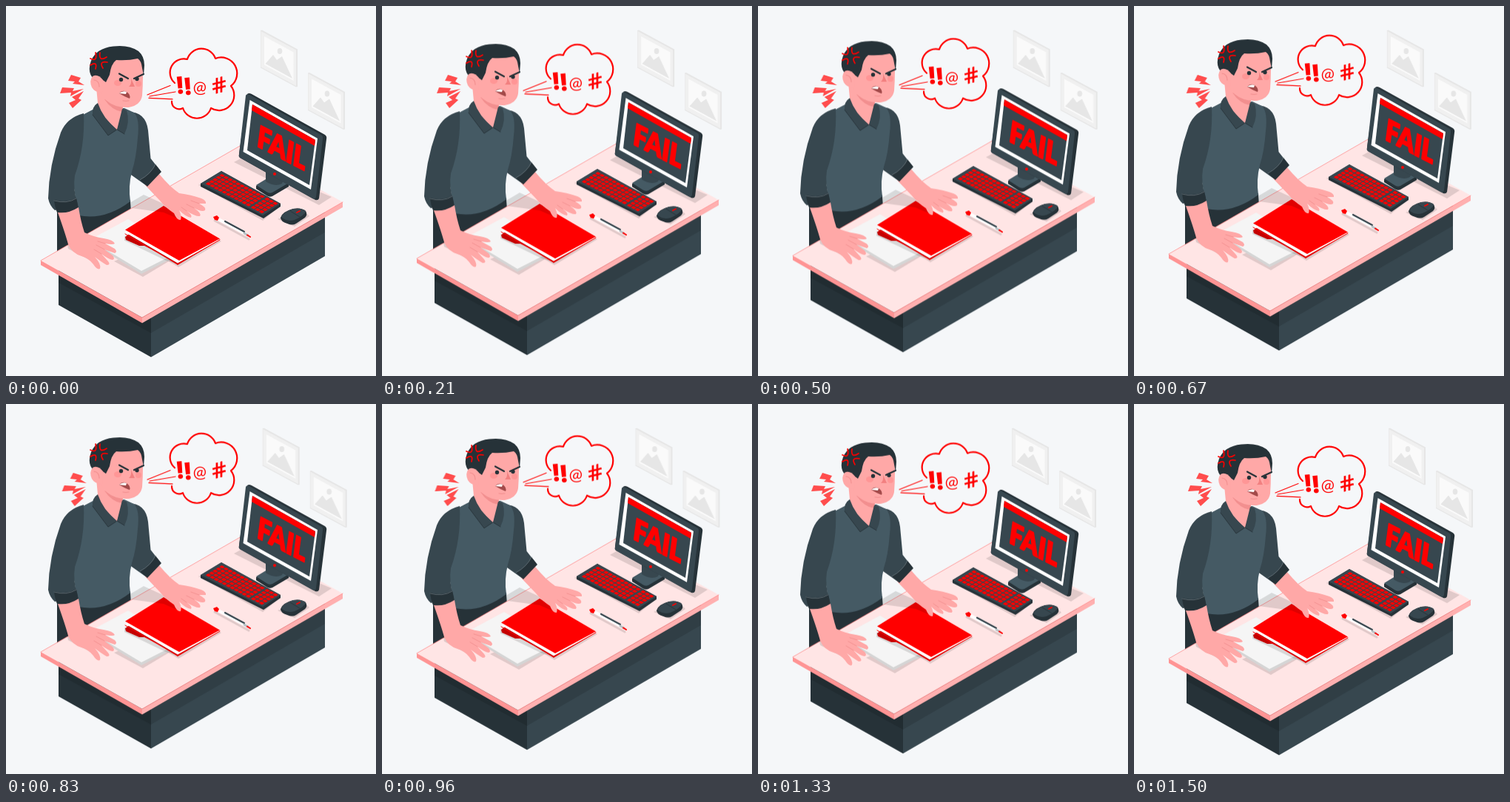
These frames come from a looping animation (500 px wide and 500 px high, 1.54 s). An HTML page:

```html
<!DOCTYPE html>
<html lang="en">
<head>
<meta charset="utf-8">
<title>Fail</title>
<style>
html, body { margin: 0; width: 100%; height: 100%; overflow: hidden; background: #f5f7f9; }
svg { display: block; width: 100vw; height: 100vh; }
text { font-family: Lato, "Open Sans", sans-serif; font-weight: 900; fill: #f00; }
.line { fill: none; stroke-linecap: round; stroke-linejoin: round; }
.shade { fill: #000; opacity: .12; }
</style>
</head>
<body>
<svg viewBox="0 0 500 500">
  <defs>
    <g id="frame">
      <path fill="#e6e6e6" d="M344 33 346 32.500 394 58.500V109L392 109.500 344 83.500Z"/>
      <path fill="#f0f0f0" d="M344.500 34 392 59.500V108L344.500 82.500Z"/>
      <path fill="#fafafa" d="M349 41 388.500 62.500V101L349 79.500Z"/>
      <path fill="#e6e6e6" d="M350.500 78 361 66 366 73 373 68 387 98Z"/>
      <ellipse fill="#e6e6e6" cx="370" cy="61" rx="3.300" ry="4"/>
    </g>
  </defs>

  <g class="shake">
    <use href="#frame"/>
    <use href="#frame" x="64" y="57.500"/>
  </g>

  <g class="float">
    <!-- body -->
    <path fill="#263238" d="M69 270 98 276 168 262 169 278 69 336Z"/>
    <path fill="#37474f" d="M165 143Q189 143 192 168L195.500 206 208 222 190 243 166 226Z"/>
    <path fill="#455a64" d="M102 148 121 138 160 138 173 144Q181 152 178 178 176 206 170 224 165 244 168 264 134 290 98 283L90 235Z"/>
    <path fill="#37474f" d="M105 145Q82 151 74 171 58 215 57 260 59 270 66 276L97 268Q90 247 93 229 107 190 105 145Z"/>
    <path fill="#263238" d="M65 262Q82 267 95 259L98 273Q84 283 70 281 66 273 65 262Z"/>
    <path class="line" stroke="#7b878d" stroke-width=".6" d="M65 263Q82 268 95 260"/>
    <!-- neck and head -->
    <path fill="#ffa8a7" d="M122 110 125 142 150 168 158 142 157 130Z"/>
    <path fill="#f28f8f" d="M133 126 158 136 157 143Q143 141 133 126Z"/>
    <path fill="#37474f" d="M124 131Q116 136 117 147L138 175 150 167Q131 152 124 131Z"/>
    <path fill="#37474f" d="M157 139 150 167 160 173Q168 157 163 141Z"/>
    <path class="line" stroke="#263238" stroke-width=".8" d="M117 147 138 175 150 167 160 173"/>
    <path fill="#ffa8a7" d="M130 84 138 70 184 68Q186 95 184 121 182 134 166 137 148 138 136 128 128 122 128 105Z"/>
    <path fill="#263238" d="M119 99Q109 90 115 74 122 57 145 54.500 166 52 179 61 187 68 187 80L186 94 184 84Q183 74 178 71 165 74 149 73 142 78 140 93L135 103 128 98Z"/>
    <path fill="#ffa8a7" d="M131 100Q124 91 117 95 112 101 116 110 121 118 130 116Z"/>
    <path class="line" stroke="#f28f8f" stroke-width="1.200" d="M119 100Q126 101 126 109"/>
    <ellipse fill="#ff8a8a" opacity=".6" cx="151" cy="104" rx="5" ry="4"/>
    <ellipse fill="#ff8a8a" opacity=".6" cx="179" cy="105" rx="4" ry="4"/>
    <path fill="#f28080" d="M169 98 174 109 166 109Q170 106 169 98Z"/>
    <g fill="#263238"><circle cx="155.500" cy="99.500" r="2.700"/><circle cx="177" cy="98.500" r="2.700"/></g>
    <path class="line" stroke="#263238" stroke-width="2.200" d="M153 91.500 165 98M186 92 173 98"/>
    <path fill="#a34a4a" d="M153 118Q157 113 163 116 169 120 167 125 161 123 153 118Z"/>
    <path fill="#fff" d="M153 118Q158 114 163 116L162 119Z"/>
    <path class="line" stroke="#f28f8f" d="M158 128Q162 129 166 128"/>
    <path class="line" stroke="#f00" stroke-width="1.700" d="M114 71Q124 76 121 63M127 63Q125 76 136 69M137 76Q125 74 131 84M121 85Q124 74 114 80"/>

    <!-- desk -->
    <path fill="#263238" d="M71 350 196 412V474.500L71 404Z"/>
    <path fill="#37474f" d="M196 412 431 278V338L196 474.500Z"/>
    <path class="shade" d="M71 350 196 412V442L71 374Z"/>
    <path class="shade" d="M196 412 431 278V306L196 442Z"/>
    <path fill="#ffe5e5" d="M47 344 318 188 455 265 184 421Z"/>
    <path fill="#ff9494" d="M47 344 184 421V428.500L47 350Z"/>
    <path fill="#ffb0b0" d="M184 421 455 265V272L184 428.500Z"/>
    <path class="line" stroke="#ff8080" stroke-width=".7" d="M47 344 318 188M184 421 455 265"/>

    <!-- monitor -->
    <path class="shade" d="M308 211 317 206 440 258 423 269Z"/>
    <path fill="#263238" d="M338 243 361 229 382 239V244L360 257Q356 259 352 256L338 247Z"/>
    <path fill="#455a64" d="M338 242 361 228 382 239 360 252Q356 254 352 251Z"/>
    <path fill="#37474f" d="M351 220 376 232 373 240Q363 245 351 237Z"/>
    <path fill="#263238" d="M326 119Q328 117 332 119L431 174Q434 176 433 180L423 260Q422 263 418 262L316 205Q314 203 315 200Z"/>
    <path fill="#37474f" d="M324 121Q325 118 329 120L427 175Q429 177 428 180L419 258Q418 262 414 260L316 205Q314 203 315 200Z"/>
    <path fill="#fff" d="M329.500 127 421 179 412 248 320.500 197Z"/>
    <path fill="#37474f" d="M333 133 418 181 410 242 326 195Z"/>
    <path fill="#f00" d="M333 133 418 181 417 189 332 141Z"/>
    <circle fill="#f00" cx="363" cy="227" r="2"/>
    <text transform="matrix(.79 .41 -.13 .98 338.500 189)" font-size="40" stroke="#f00" stroke-width="2" stroke-linejoin="round">FAIL</text>

    <!-- keyboard -->
    <path class="shade" d="M260 242 292 224 371 270 347 290Z"/>
    <path fill="#263238" d="M263 240 291 223 371 267V271L348 287 263 244Z"/>
    <path fill="#37474f" d="M263 240 291 223 371 267 347 283Z"/>
    <g id="keys" fill="#f00" transform="matrix(.83 .435 .27 -.165 264 240)"></g>

    <!-- mouse -->
    <path class="shade" d="M367 288 400 274 410 284 390 298Z"/>
    <path fill="#263238" d="M371 286Q373 278 388 274 399 272 405 277 408 282 404 286L392 294Q387 297 380 294 371 291 371 286Z"/>
    <path fill="#37474f" d="M372 285Q375 278 388 274 399 272 405 277 404 283 390 289 379 292 372 285Z"/>
    <path class="line" stroke="#f00" stroke-width="1.800" d="M393 279 397 277"/>
    <path class="line" stroke="#263238" stroke-width=".8" d="M384 277 397 285"/>

    <!-- pen -->
    <path class="line" stroke="#000" opacity=".12" stroke-width="3" d="M282 290 328 315"/>
    <path class="line" stroke="#fff" stroke-width="4" d="M288 288.500 324 308"/>
    <path class="line" stroke="#37474f" stroke-width="2.200" d="M296 291 322 305"/>
    <path class="line" stroke="#b8c0c4" stroke-width="3" d="M322 307 327 310"/>
    <path class="line" stroke="#f00" stroke-width="2" d="M326 309.500 330 312"/>
    <path fill="#f00" d="M280 285 285 283 288 286 286 290 282 289Z"/>

    <!-- papers and folder -->
    <path class="shade" d="M146 345 185 366 220 345 233 353 291 318 270 306 180 330Z"/>
    <path fill="#d5d5d5" d="M113 319 165 290 236 335 183 362Z"/>
    <path fill="#f5f5f5" d="M113 316 165 288 236 331 183 358Z"/>
    <path class="shade" d="M160 311 195 326 230 348 216 344 160 317Z"/>
    <path fill="#c40000" d="M161 312 216 274 289 316 232 350 205 333 187 324 180 324 162 316Z"/>
    <path fill="#fff" d="M161 306 216 273 289 316 232 347.500Z"/>
    <path fill="#f00" d="M161 302.500 213 270 289 314.500 234 344Z"/>
    <path class="line" stroke="#f00" d="M161 308 232 349 289 316"/>

    <!-- arms on the desk -->
    <path class="shade" d="M169 273V265L186 255 210 266 236 289 213 279ZM82 318 84 328 118 346 126 354 104 332Z"/>
    <path fill="#ffa8a7" d="M188 242 207 227Q222 245 234 253 250 255 264 260 271 263 270 267L261 267Q271 272 269 276 265 279 254 273 265 280 262 284 257 285 244 277 253 283 250 286 243 285 234 276 238 284 236 289 231 290 227 280 216 273 208 263Z"/>
    <path fill="#263238" d="M202 214 210 224 191 244 181 235Q196 227 202 214Z"/>
    <path class="line" stroke="#7b878d" stroke-width=".6" d="M181 235Q196 227 202 214"/>
    <path fill="#ffa8a7" d="M70 279Q84 281 98 272 101 291 106 306 118 312 132 314 145 316 147 321 145 323 134 321L147 328Q151 332 147 334L133 329 144 337Q148 342 144 343 138 342 129 335L138 345Q142 350 136 350 129 346 120 339 129 349 127 355 123 357 118 349 112 341 102 338 89 334 84 322 80 307 70 279Z"/>
    <path class="line" stroke="#f28f8f" stroke-width=".8" d="M134 321 124 318M133 329 122 323M129 335 119 329M261 267 250 263M254 273 244 268M244 277 237 272"/>
  </g>

  <g class="shake" fill="#ff4d4d">
    <path d="M84 101 88 93 101 97 98 102 106 107 90 105 93 102Z"/>
    <path d="M73 118 76 110 92 111 90 115 105 112 87 122 88 117Z"/>
    <path d="M85 131 90 138 102 127 98 125 105 115 89 123 94 127Z"/>
  </g>

  <g class="rise">
    <path class="line" stroke="#f00" stroke-width="2.200" d="M228 104A18.600 18.600 0 0 1 245 72 20 20 0 0 1 283 71 21.500 21.500 0 0 1 304 108 20.500 20.500 0 0 1 277 138 20 20 0 0 1 239 138 10 10 0 0 1 224 129"/>
    <path class="line" stroke="#f00" stroke-width="1.200" d="M191 120 222 107.500M194 122 229 116M193 124.500 225 126"/>
    <text x="230 240.500" y="119 120.500" rotate="-5" font-size="32" style="font-family:Inter,sans-serif">!!</text>
    <text transform="translate(253 118) rotate(-3)" font-size="22" style="font-weight:400">@</text>
    <text transform="translate(288 107) rotate(-14)" y="10" text-anchor="middle" font-size="28" style="font-family:'DejaVu Sans',sans-serif;font-weight:400" stroke="#f00" stroke-width=".5">#</text>
  </g>
</svg>
<script>
const LOOP = 1540, CYCLE = 1500;

const keys = document.getElementById("keys");
for (let row = 0; row < 5; row++) {
  for (let col = 0; col < 14; col++) {
    const key = document.createElementNS(keys.namespaceURI, "rect");
    key.setAttribute("x", 4 + col * 6.5 + (col > 10 ? 2 : 0));
    key.setAttribute("y", 9 + row * 17);
    key.setAttribute("width", 5.2);
    key.setAttribute("height", 13);
    keys.append(key);
  }
}

// steps: [share of the cycle, dx, dy]; the last pose holds to the end of the loop
function play(selector, steps, easing) {
  const frames = steps.map(([at, x, y]) => ({
    offset: at * CYCLE / LOOP, easing, transform: `translate(${x}px, ${y}px)`
  }));
  frames.push({ offset: 1, transform: "translate(0px, 0px)" });
  for (const el of document.querySelectorAll(selector)) {
    el.animate(frames, { duration: LOOP, iterations: Infinity });
  }
}

const lift = h => [[0, 0, 0], [.5, 0, -h], [1, 0, 0]];
const jolts = [0, -1, 2, -4, 4, -4, 4, -4, 2, -1, 0].map((x, i) => [i / 10, x, 0]);

play(".float", lift(10), "linear");
play(".rise", lift(20), "linear");
play(".shake", jolts, "ease");
</script>
</body>
</html>
```
